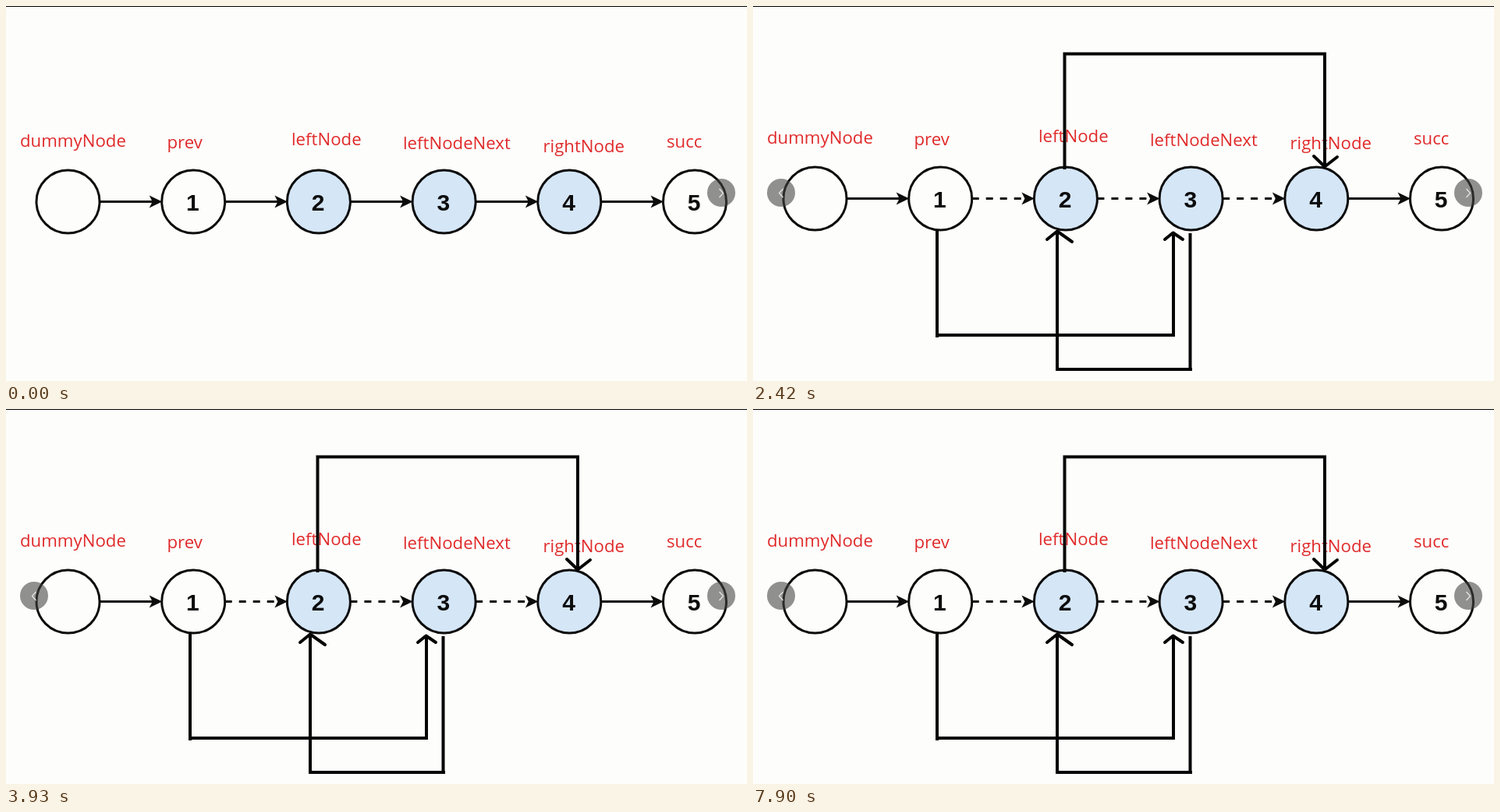
An HTML page for the animation above (8 s loop, 950 px wide and 482 px high).

```html
<!DOCTYPE html>
<html lang="en">
<head>
<meta charset="utf-8">
<title>Linked list reversal</title>
<style>
html, body { margin: 0; width: 100%; height: 100%; overflow: hidden; background: #fdfdfc; }
svg { display: block; width: 950px; height: 482px; }
.label { font: 22.2px "Open Sans", "Noto Sans", sans-serif; fill: #e02a2a; }
.digit { font: bold 30px "Liberation Sans", Arial, sans-serif; fill: #0c0c0c; text-anchor: middle; }
.line { stroke: #0c0c0c; stroke-width: 3; }
.route { fill: none; stroke: #050505; stroke-width: 4; }
.head { stroke-linecap: round; stroke-linejoin: round; }
.button circle { fill: rgba(66, 66, 66, .58); }
.button path { fill: none; stroke: #e4e4e4; stroke-width: 1.3; }
</style>
</head>
<body>
<svg viewBox="0 0 950 482">
  <rect width="950" height="1"/>
  <g id="list"></g>
  <g id="routes">
    <path class="route" d="M399.500 210V61.500H733V205"/>
    <path class="route head" d="M719 193L733 206.500L749 194"/>
    <path class="route" d="M236 288V426M234 423H539V293"/>
    <path class="route head" d="M528 300L538.500 291.500L551 300"/>
    <path class="route" d="M560.500 292V467M563 467H390V291"/>
    <path class="route head" d="M377 300L390 289.500L409 303"/>
  </g>
  <g class="button" id="back"><circle cx="36" cy="240" r="18"/><path d="M38.500 235L33.500 240.500L38.500 246"/></g>
  <g class="button"><circle cx="917" cy="240" r="18"/><path d="M914.500 235L919.500 240.500L914.500 246"/></g>
</svg>
<script>
const LOOP = 8000, SWITCH = 2420;
const list = document.getElementById('list');
const extras = ['routes', 'back'].map(id => document.getElementById(id));

// name, left edge, baseline
const labels = [
  ['dummyNode', 18, 180.5], ['prev', 206.5, 183], ['leftNode', 366, 178.5],
  ['leftNodeNext', 509, 184], ['rightNode', 688.5, 188], ['succ', 847, 181.5]
];
const nodeX = i => 79.5 + i * 160.7;
const isInner = i => i >= 2 && i <= 4;

function drawList(reversed) {
  const shift = reversed ? -4 : 0;
  list.setAttribute('transform', `translate(0 ${shift})`);
  list.innerHTML = labels.map(([name, x, y], i) => {
    const cx = nodeX(i), tip = nodeX(i + 1) - 40;
    const dash = reversed && i >= 1 && i <= 3 ? 'stroke-dasharray="9"' : '';
    const arrow = i < 5 ? `
      <line class="line" x1="${cx + 40.5}" x2="${tip - 12}" y1="251.5" y2="251.5" ${dash}/>
      <path fill="#0c0c0c" d="M${tip} 251.5l-16.5 -8l4 8l-4 8z"/>` : '';
    return `${arrow}
      <circle class="line" cx="${cx}" cy="251.5" r="40.5" fill="${isInner(i) ? '#d5e6f7' : '#fdfdfc'}"/>
      <text class="digit" x="${cx - 0.8}" y="263">${i || ''}</text>
      <text class="label" x="${x}" y="${y}">${name}</text>`;
  }).join('');
  for (const part of extras) part.style.display = reversed ? '' : 'none';
}

let shown;
function tick() {
  const reversed = performance.now() % LOOP >= SWITCH;
  if (reversed !== shown) drawList(shown = reversed);
  requestAnimationFrame(tick);
}
tick();
</script>
</body>
</html>
```
